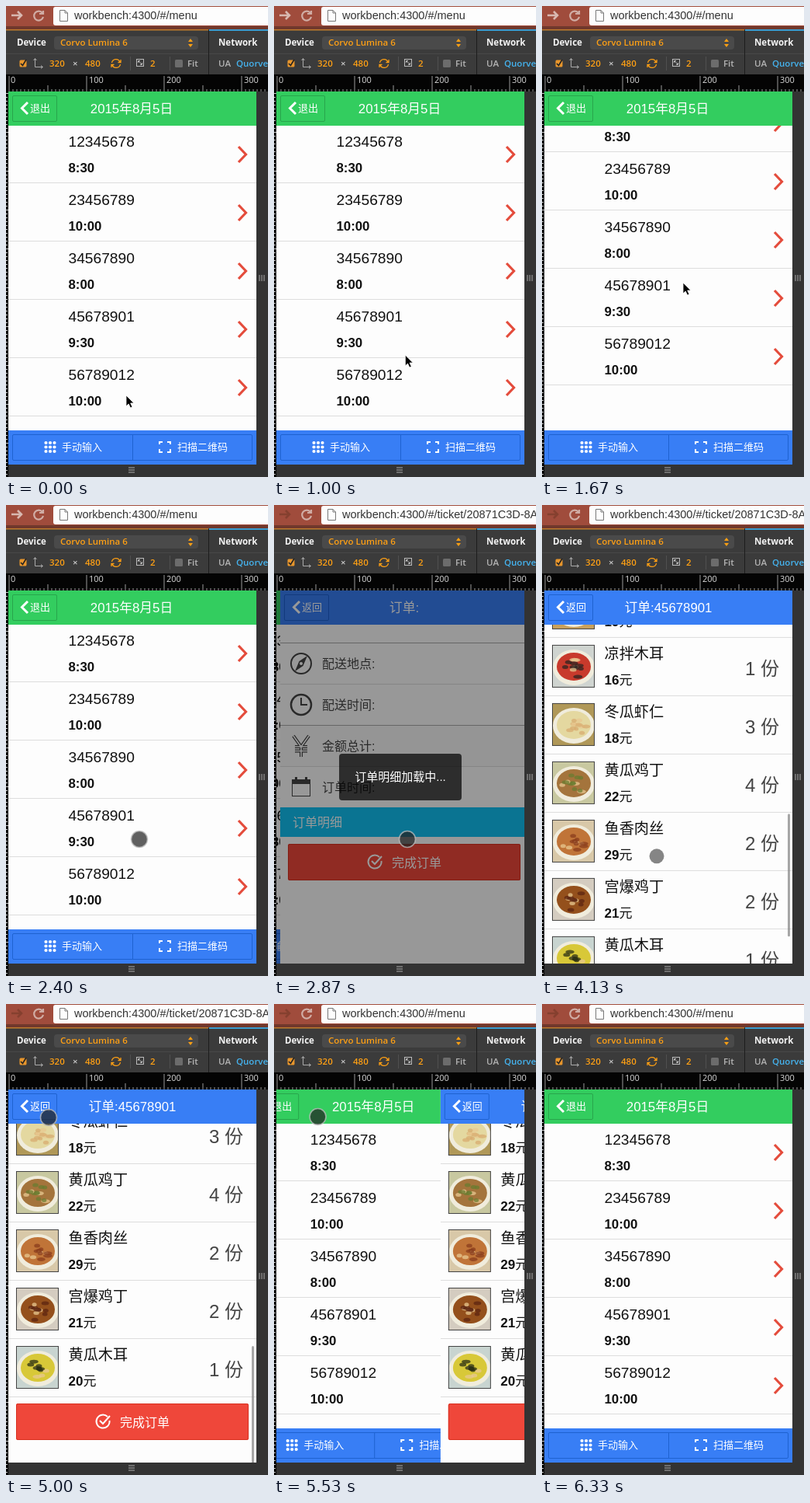
These frames come from a looping animation (338 by 606 pixels, 6.39 s). An HTML page:

```html
<!DOCTYPE html>
<html lang="zh">
<head>
<meta charset="utf-8">
<style>
html, body { margin: 0; width: 100%; height: 100%; overflow: hidden; background: #333; }
#stage { display: block; width: 100vw; height: 100vh; }
text { font-family: "Liberation Sans", "Noto Sans CJK SC", "Noto Sans CJK", sans-serif; white-space: pre; }
.ui { font-family: "Open Sans", "Noto Sans", sans-serif; }
</style>
</head>
<body>
<svg id="stage" viewBox="0 0 338 606"></svg>
<script>
const LOOP = 6390, STEP = 200 / 3;
const BLUE = '#387ef5', NAVY = '#1f62d0', RED = '#ef473a', PAPER = '#fdfdfd', INK = '#111', ORANGE = '#ffa014';
const $ = id => document.getElementById(id);

// y is the vertical middle of the text
const text = (x, y, str, size, fill, attrs = '') =>
  `<text x="${x}" y="${y + size * .36}" font-size="${size}" fill="${fill}" ${attrs}>${str}</text>`;
const rect = (x, y, w, h, fill, attrs = '') =>
  `<rect x="${x}" y="${y}" width="${w}" height="${h}" fill="${fill}" ${attrs}/>`;
const line = (d, stroke, width = 1, attrs = '') =>
  `<path d="${d}" fill="none" stroke="${stroke}" stroke-width="${width}" ${attrs}/>`;
const disc = (x, y, r, fill, attrs = '') => `<circle cx="${x}" cy="${y}" r="${r}" fill="${fill}" ${attrs}/>`;
const view = (x, y, w, h, body) =>
  `<svg x="${x}" y="${y}" width="${w}" height="${h}" viewBox="${x} ${y} ${w} ${h}">${body}</svg>`;
const ui = (x, y, str, fill, weight = 600) => text(x, y, str, 11.5, fill, `class="ui" font-weight="${weight}"`);
const range = (n, f) => Array.from({ length: n }, (_, i) => f(i)).join('');
const MID = 'text-anchor="middle"';

function random(seed) {
  return () => (seed = seed * 16807 % 2147483647) / 2147483647;
}

function browser() {
  const resizer = (x, y, turn) =>
    `<g transform="translate(${x} ${y}) rotate(${turn})">${line('M-4 -3H4M-4 0H4M-4 3H4', '#aaa')}</g>`;
  return rect(0, 0, 338, 27, '#a04c3c') + rect(0, 26, 338, 4, '#70382c')
    + rect(61, 1, 290, 24, PAPER, 'rx="3"')
    + line('M7 12H20M15 7L20 12L15 17', '#d8b8b0', 2.6, 'id="forward"')
    + line('M47 9A6 6 0 1 0 48 14M48 6V10H43', '#d0aca4', 2.2)
    + line('M69.500 5.500H76L79.500 9V19.500H69.500ZM76 5.500V9H79.500', '#777', 1)
    + text(88, 12, '', 14.5, '#333', 'id="url"')
    // inspector toolbar
    + rect(0, 30, 338, 58, '#3b3b3b') + rect(0, 30, 261, 1.5, '#c07a2c') + rect(262, 30, 76, 2, '#3a9cd0')
    + rect(0, 61, 338, 1, '#484848') + rect(261, 31, 1, 57, '#1c1c1c')
    + ui(14, 47, 'Device', '#f4f4f4', 700) + ui(274, 47, 'Network', '#f4f4f4', 700)
    + rect(62, 39, 186, 17, '#4a4a4a', 'rx="4"') + ui(70, 47, 'Corvo Lumina 6', ORANGE)
    + `<path d="M235 46L238 42L241 46ZM235 49L238 53L241 49Z" fill="${ORANGE}"/>`
    + rect(17.5, 69.5, 9, 9, '#e8962c', 'rx="1.500"') + line('M19 74L21.500 76.500L26 69', '#222', 1.6)
    + line('M37.500 68V78.500H47M35.500 70L37.500 67.500L39.500 70M45 76.500L47.500 78.500L45 80.500', '#aaa')
    + ui(56, 74, '320', ORANGE) + ui(86, 74, '×', '#ccc') + ui(102, 74, '480', ORANGE)
    + line('M136.500 73A5.500 5.500 0 0 1 147 72M147.500 75A5.500 5.500 0 0 1 137 76M148 69V72.500H144.500M136 79V75.500H139.500', ORANGE, 1.3)
    + rect(160, 65, 1, 18, '#505050') + rect(211, 65, 1, 18, '#505050')
    + rect(168.5, 68.5, 9, 9, 'none', 'stroke="#bbb"') + line('M170.500 73V70.500H173M175.500 73V75.500H173M171 71L175 75', '#bbb')
    + ui(186, 74, '2', ORANGE)
    + rect(218, 69, 10, 10, '#6c6c6c', 'rx="1.500"') + ui(234, 74, 'Fit', '#b4b4b4')
    + ui(274, 74, 'UA', '#b4b4b4') + ui(297, 74, 'Quorvex', '#45b4f0')
    // rulers
    + rect(0, 88, 338, 22, '#040404') + rect(0, 110, 3, 496, '#040404')
    + range(68, i => rect(3.5 + i * 5, i % 20 ? (i % 10 ? 107 : 102) : 90, 1, i % 20 ? (i % 10 ? 3 : 8) : 20, '#999'))
    + range(4, i => text(6 + i * 100 + (i ? 1 : 0), 95, i * 100, 11, '#ddd', 'class="ui"'))
    + range(99, i => rect(0, 112 + i * 5, i % 10 ? 2 : 3, 1, '#ccc'))
    // frame around the device
    + rect(323, 110, 15, 496, '#333') + rect(3, 590, 335, 16, '#333')
    + resizer(330, 350, 90) + resizer(162, 597, 0);
}

const header = (fill, edge, back, title) =>
  rect(3, 110, 320, 44, fill) + rect(8.5, 115.5, 57, 33, 'none', `stroke="${edge}" rx="1.500"`)
  + line('M28 124L20.500 131.500L28 139', '#fff', 3) + text(31, 131, back, 13, '#fff') + title;

function listPage() {
  const orders = ['12345678 8:30', '23456789 10:00', '34567890 8:00', '45678901 9:30', '56789012 10:00'];
  const rows = orders.map((order, i) => {
    const [id, time] = order.split(' '), y = 153 + i * 75;
    return text(80.5, y + 21, id, 19.2, INK) + text(80.5, y + 55, time, 16.8, INK, 'font-weight="700"')
      + line(`M300 ${y + 28}L309.500 ${y + 38}L300 ${y + 48}`, '#e44c3c', 3.2) + rect(3, y + 74, 320, 1, '#ddd');
  }).join('');
  const corners = 'M198 564V561H202M208 561H212V564M212 570V574H208M202 574H198V570';
  return rect(3, 110, 320, 480, PAPER)
    + view(3, 154, 320, 392, `<g id="rows">${rows}</g>`)
    + header('#33cd5f', '#28a54c', '退出', text(162, 132, '2015年8月5日', 16.8, '#fff', MID))
    + rect(3, 546, 320, 44, BLUE) + rect(8.5, 551.5, 309, 33, 'none', `stroke="${NAVY}" rx="1.500"`)
    + rect(163, 551, 1, 34, NAVY)
    + range(9, i => disc(51.5 + i % 3 * 5.5, 562 + (i / 3 | 0) * 5.5, 2.1, '#fff'))
    + text(72, 567, '手动输入', 13, '#fff')
    + line(corners, '#fff', 2) + text(221, 567, '扫描二维码', 13, '#fff');
}

// name, price, count, background, food, garnish
const dishes = [
  ['辣子肥肠', 26, 3, '#7d9aa8', '#c47a3c', '#8a3018'],
  ['糖醋里脊', 24, 4, '#d9d2c0', '#a8492c', '#6f9a3c'],
  ['羊血黄豆', 19, 2, '#c9a15c', '#6e3418', '#d8b070'],
  ['凉拌木耳', 16, 1, '#cfd4d0', '#c83a2c', '#2c2420'],
  ['冬瓜虾仁', 18, 3, '#b09858', '#e4d8a0', '#d8ac70'],
  ['黄瓜鸡丁', 22, 4, '#c8c8a0', '#a4743c', '#6a7c30'],
  ['鱼香肉丝', 29, 2, '#d8c8a8', '#c07438', '#8a3c1c'],
  ['宫爆鸡丁', 21, 2, '#d4ccc0', '#94501c', '#5c2410'],
  ['黄瓜木耳', 20, 1, '#c8d4d0', '#d8c838', '#2c3014']
];

function photo(y, seed, back, food, garnish) {
  const rnd = random(seed * 977 + 31);
  const bits = range(12, i => {
    const a = rnd() * 6.3, r = rnd() * 14;
    return `<ellipse cx="${41 + r * 1.2 * Math.cos(a)}" cy="${y + 28 + r * Math.sin(a)}" rx="${3 + rnd() * 3}" ry="2.500" fill="${i % 3 ? garnish : '#e8c890'}" opacity=".75"/>`;
  });
  return view(13, y, 55, 55, rect(13, y, 55, 55, back)
    + `<ellipse cx="41" cy="${y + 29}" rx="27" ry="23" fill="#f0ecdc"/><ellipse cx="41" cy="${y + 28}" rx="22" ry="18" fill="${food}"/>`
    + bits) + rect(13.5, y + .5, 54, 54, 'none', 'stroke="#444"');
}

const button = y => rect(13, y, 300, 47, RED, 'rx="2"') + rect(13.5, y + .5, 299, 46, 'none', 'stroke="#d83020" rx="2"')
  + line(`M131 ${y + 17}A8.500 8.500 0 1 0 133.500 ${y + 22}M121 ${y + 22}L125 ${y + 26}L134 ${y + 16}`, '#fff', 2)
  + text(147, y + 24, '完成订单', 16, '#fff');

function detailPage() {
  const ink = '#444', yen = 'M20 297L30 311L40 297M30 311V324M22 311H38M22 316.500H38';
  const icons = [
    disc(30, 204, 13, 'none', `stroke="${ink}" stroke-width="2"`) + `<path d="M38 194L32.500 207L22 214L27.500 201Z" fill="${ink}"/>` + disc(30, 204, 2, '#fff'),
    disc(30, 257, 13, 'none', `stroke="${ink}" stroke-width="2.500"`) + line('M30 248V257H38', ink, 2),
    line(yen, ink, 4) + line(yen, PAPER, 1.6),
    rect(18.5, 353.5, 23, 21, 'none', `stroke="${ink}"`) + rect(18, 353, 24, 6, ink) + rect(22, 350, 3, 5, ink) + rect(35, 350, 3, 5, ink)
  ];
  const labels = ['配送地点:', '配送时间:', '金额总计:', '订单时间:'];
  const values = ['', ' 9:30', ' 35', ' 2015年06月02日'];
  const info = labels.map((label, i) =>
    rect(3, 178 + i * 53, 320, 52, i == 2 ? '#f8f8f8' : PAPER) + rect(3, 230 + i * 53, 320, 1, i % 2 ? '#aaa' : '#ddd')
    + icons[i] + text(57, 204 + i * 53, `${label}<tspan class="loaded">${values[i]}</tspan>`, 16, ink)).join('');
  const items = dishes.map(([name, price, count, ...tones], i) => {
    const y = 427 + i * 75;
    return photo(y + 10, i + 1, ...tones) + text(80.5, y + 21, name, 19.2, INK)
      + text(80.5, y + 55, `<tspan font-weight="700">${price}</tspan>元`, 17, INK)
      + text(306, y + 40, `${count} 份`, 24, ink, 'text-anchor="end"') + rect(3, y + 75, 320, 1, '#ddd');
  }).join('');
  return rect(3, 110, 320, 480, PAPER)
    + view(3, 154, 320, 436, `<g id="order">${rect(3, 177, 320, 1, '#aaa')}${info}`
      + rect(3, 389, 320, 38, '#11c1f3') + text(19, 408, '订单明细', 16, '#fff')
      + `<g class="loaded">${items}${button(1111)}</g><g id="empty">${button(436)}</g></g>`
      + rect(317, 0, 3, 158, '#888', 'id="bar" rx="1.500" opacity=".75"'))
    + header(BLUE, NAVY, '返回', text(163, 132, '', 16.8, '#fff', MID + ' id="title"'));
}

$('stage').innerHTML = browser()
  + view(3, 110, 320, 480, `<g id="list">${listPage()}</g><g id="detail">${detailPage()}</g><g id="loading">`
    + rect(3, 110, 320, 480, '#000', 'opacity=".4"') + rect(84, 320, 158, 60, '#000', 'rx="4" opacity=".7"')
    + text(163, 350, '订单明细加载中...', 15, '#fff', MID) + '</g>')
  + `<path id="arrow" d="M0 0V14L3.200 11L5.500 16L8 15L5.700 10H10Z" fill="#000" stroke="#fff" stroke-width=".8"/>`
  + disc(0, 0, 10.5, '#222', 'id="touch"');

// eased track through [time, value] points
function track(t, points) {
  const i = points.findIndex(p => p[0] > t);
  if (i < 0) return points[points.length - 1][1];
  if (!i) return points[0][1];
  const [t0, a] = points[i - 1], [t1, b] = points[i], k = (t - t0) / (t1 - t0);
  return a + (b - a) * k * k * (3 - 2 * k);
}
const cursorX = [[0, 155], [600, 160], [1500, 182], [1700, 182], [2200, 172], [3130, 172], [3600, 181], [3800, 184], [4130, 148], [4500, 150], [5000, 55], [5200, 45], [5450, 45], [6200, 352]];
const cursorY = [[0, 501], [600, 501], [1600, 356], [1700, 356], [2200, 430], [3200, 430], [3600, 290], [3780, 250], [4060, 455], [4130, 452], [4500, 330], [5000, 146], [5200, 132], [5450, 132], [6200, 480]];
const listScroll = [[0, 0], [1070, 0], [1600, 40], [1740, 40], [2130, 0]];
const orderScroll = [[3200, 0], [3600, 107], [4130, 482], [4600, 597]];
const slide = [[2530, 320], [2870, 5], [2940, 0], [5330, 0], [5670, 320]];

const show = (el, on) => el.style.display = on ? '' : 'none';
const move = (id, x, y) => $(id).setAttribute('transform', `translate(${x} ${y})`);

function draw(now) {
  const t = Math.floor((now % LOOP + 4) / STEP) * STEP + 4;
  const away = t > 2530 && t < 5400, loaded = t > 3130, x = track(t, slide), scroll = track(t, orderScroll);
  $('url').textContent = 'workbench:4300/#/' + (away ? 'ticket/20871C3D-8AE5' : 'menu');
  $('forward').setAttribute('stroke', t < 2530 ? '#d8b8b0' : '#85402f');
  move('rows', 0, -track(t, listScroll));
  move('list', -100 * (1 - x / 320), 0);
  move('detail', x, 0);
  move('order', 0, -scroll);
  show($('detail'), x < 320);
  show($('loading'), t > 2660 && !loaded);
  document.querySelectorAll('.loaded').forEach(el => show(el, loaded));
  show($('empty'), !loaded);
  $('title').textContent = '订单:' + (loaded ? '45678901' : '');
  $('bar').setAttribute('y', 219 + .37 * scroll);
  show($('bar'), t > 3260 && t < 5200);

  const touching = t > 2260, pressed = t > 4050 && t < 4500;
  const cx = track(t, cursorX), cy = track(t, cursorY);
  move('arrow', cx, cy);
  move('touch', cx, cy);
  show($('arrow'), !touching);
  show($('touch'), touching);
  const touch = $('touch');
  touch.setAttribute('r', pressed ? 9.5 : 10.5);
  touch.setAttribute('fill-opacity', pressed ? .55 : .72);
  touch.setAttribute('stroke', pressed ? 'none' : 'rgba(190,190,190,.75)');
  touch.setAttribute('stroke-width', 1.6);
}

const start = performance.now();
function frame() {
  draw(performance.now() - start);
  requestAnimationFrame(frame);
}
frame();
</script>
</body>
</html>
```
